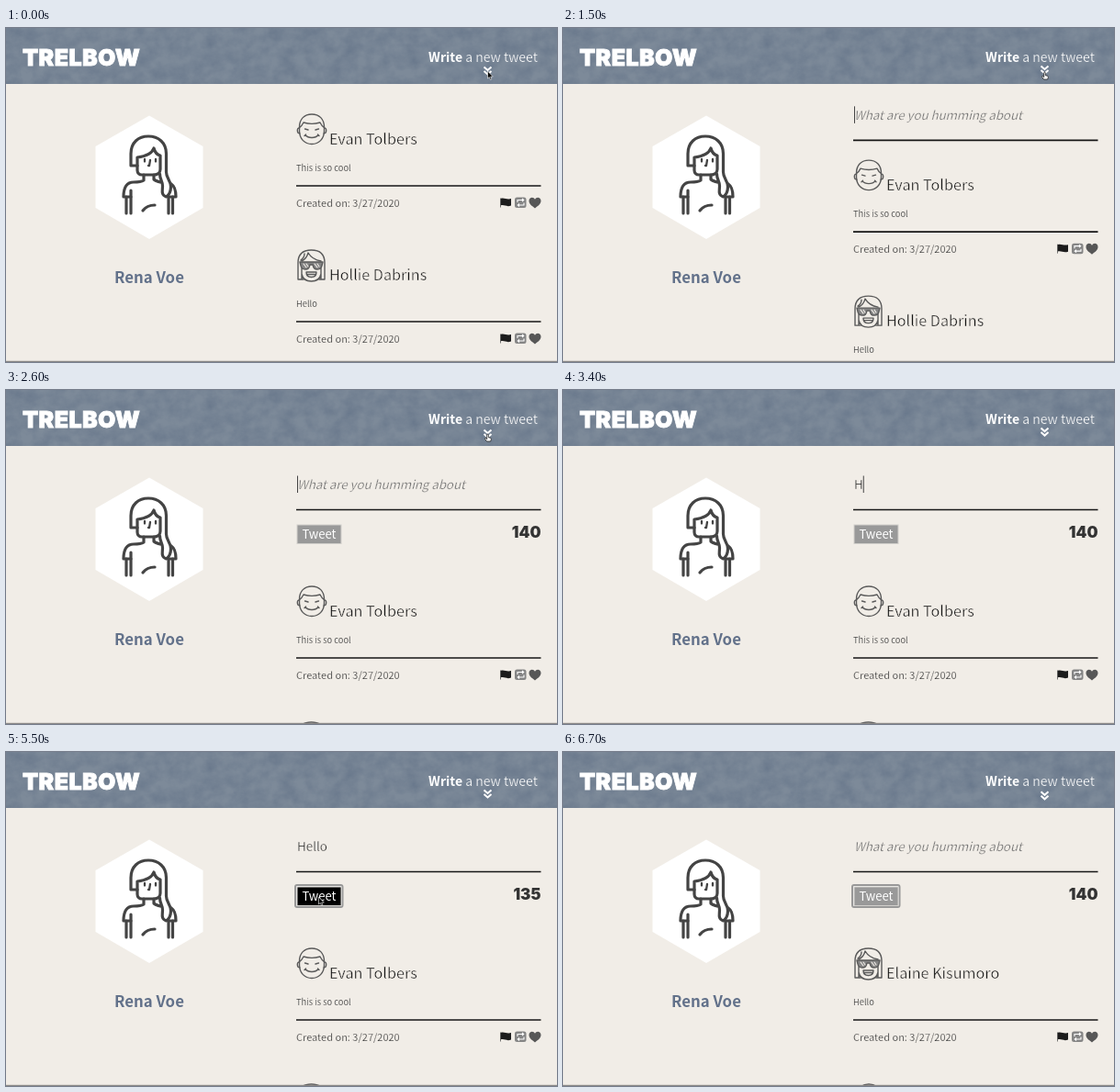
An HTML page that plays this animation: 600x364 px, repeating every 6800 ms.

```html
<!DOCTYPE html>
<html lang="en">
<head>
<meta charset="utf-8">
<title>Trelbow</title>
<style>
html, body { margin: 0; width: 100%; height: 100%; overflow: hidden; background: #f1ede7; }
svg { display: block; }
/* A thin stroke in the ground colour gives the text its light weight */
text {
  font-family: "Noto Sans CJK JP", "Noto Sans CJK SC", "Noto Sans CJK", "Open Sans", sans-serif;
  font-weight: 300; fill: #222; white-space: pre; stroke: #f1ede7; stroke-width: .25;
}
.bold { font-weight: 700; stroke: none; }
.block { font-family: Inter, "Liberation Sans", sans-serif; font-weight: 900; stroke: none; }
.name { font-size: 16.2px; fill: #111; stroke-width: .45; }
.message { font-size: 9.3px; fill: #444; stroke-width: .15; }
.date { font-size: 11px; fill: #333; }
.field { font-size: 13.4px; stroke-width: .35; }
.line { fill: none; stroke: #444; stroke-linecap: round; stroke-linejoin: round; }
.avatar { stroke: #5a5a5a; stroke-width: 1.4; }
.rule { stroke: #161616; stroke-width: 1.6; }
</style>
</head>
<body>
<svg width="600" height="364" viewBox="0 0 600 364">
  <defs>
    <filter id="mottle" x="0" y="0" width="100%" height="100%" color-interpolation-filters="sRGB">
      <feTurbulence type="fractalNoise" baseFrequency=".06 .07" numOctaves="5" seed="8"/>
      <feColorMatrix values="0 0 0 0 .4  0 0 0 0 .46  0 0 0 0 .54  1.3 0 0 0 -.35"/>
    </filter>
    <clipPath id="formClip"><rect id="formWindow" x="310" y="61" width="290" height="0"/></clipPath>

    <g id="man" class="line avatar">
      <path d="M3.500 15C3.500 6 9 1 17 1s13.500 5 13.500 14v4c0 9-6 14.500-13.500 14.500S3.500 28 3.500 19Z"/>
      <path d="M3.500 16C.5 15.500.5 22 4 22M30.500 16c3-.5 3 6-.5 6M4 15c2-1 3-3 4-5 5 1.500 13 1.500 18 0 1 2 2 4 4 5"/>
      <path d="M9.500 17l3.500 1M24.500 17l-3.500 1M10 23.500c3 4 11 4 14 0M9 24.500l1.500-1.500M25 24.500l-1.500-1.500"/>
    </g>
    <g id="woman" class="line avatar">
      <path d="M2 33V15C2 5 8 1 16.500 1S31 5 31 15v18H25M2 33h6M6 21v6c1 5 5 8 10.500 8s9.500-3 10.500-8v-6M6 32V21M27 32V21M6 13c4-2 6-5 7-9M13 4c3 5 8 8 14 9M9 5c0 3-1 5-4 7"/>
      <path d="M4 14h25l-1 4c-.5 3-2 4-5 4s-4-1-5-5h-3c-1 4-2 5-5 5s-4.500-1-5-4Z" fill="#858585"/>
      <path d="M8 16l3 4M11 16l2 3M20 16l3 4M23 16l2 3" stroke="#f1ede7" stroke-width="1.100"/>
      <path d="M11 25h11c0 4-2 5.500-5.500 5.500S11 29 11 25Zm1 2.500h9"/>
    </g>
    <g id="tools">
      <path d="M538.500 186c4-1.500 7 1.500 11.500 0v7.500c-5 2-7.500-1.500-11.500 0Z" fill="#1c1c1c"/>
      <path d="M538.500 185.500v10" stroke="#555" stroke-width=".8"/>
      <rect x="554" y="184.500" width="12.500" height="11.500" rx="2.500" fill="#858585"/>
      <path d="M557 190v-2.500h6.500m-1.500-1.500 1.700 1.500-1.700 1.500M564 190.500v2.500h-6.500m1.500-1.500-1.700 1.500 1.700 1.500" fill="none" stroke="#fff" stroke-width="1.100"/>
      <path d="M576 196.500c-4-3-6.500-5-6.500-8.200 0-4 5-5 6.500-1.500 1.500-3.500 6.500-2.500 6.500 1.500 0 3.200-2.500 5.200-6.500 8.200Z" fill="#575757"/>
    </g>
    <path id="arrow" d="M0 0V8l1.800-1.600L3 9.300 4.300 8.700 3.200 6H5.800Z" fill="#000" stroke="#fff" stroke-width=".6"/>
    <path id="hand" d="M-.8 0C-.8-1.200.8-1.200.8 0V2.600L3 3.200C4 3.500 4 4.600 3.200 7H-1L-3 4.200C-3 3-2 3.200-.8 4.600Z" fill="#fff" stroke="#222" stroke-width=".8"/>
    <path id="beam" d="M-2-4Q0-4 0-3Q0-4 2-4M0-3V4M-2 5Q0 5 0 4Q0 5 2 5M-1 1H1" fill="none" stroke="#222" stroke-width=".9"/>
  </defs>

  <rect width="600" height="364" fill="#f1ede7"/>

  <path d="M156 95.500l58.500 33.500v67L156 230 97.500 196v-67Z" fill="#fff"/>
  <g class="line" stroke="#3b3838" stroke-width="3.200">
    <path d="M143 150h-7V137c0-12 8-19 19-19s19.500 7 19.500 19v20c0 7 5 9 5 16 0 6-2 9-5 11-6-2-4-7-4-12 0-5-3-7-3-13"/>
    <path d="M143 141v14c0 3 2 5 5 5h13c4 0 7-2 7-6V139M143 141c8-1 16-4 18-10 1 4 3 7 7 8"/>
    <path d="M150 160v6c-3 2-7 2-11 2-7 0-11 5-11 16h8M161 160v5c2 2 4 2 7 3M180 170c3 2 5 7 5 14h-8"/>
    <path d="M136 177v25M131 184v18M177 184v18M181.500 184v18"/>
    <path d="M149 199c3-4 7-6 13-6"/>
    <path d="M151 143v2.500M163 143v2.500M157 144l-1 6h-1" stroke-width="2.300"/>
  </g>
  <text class="bold" x="156" y="278" font-size="16.800" text-anchor="middle" style="fill:#62718a">Rena Voe</text>

  <g id="list"></g>

  <g clip-path="url(#formClip)">
    <g id="form">
      <text id="hint" class="field" x="317" y="108" letter-spacing="-.08" font-style="italic" style="fill:#686868">What are you humming about</text>
      <text id="typed" class="field" x="317" y="108"></text>
      <path id="caret" d="M0 93.500V112" stroke="#444"/>
      <path class="rule" d="M316 130.500H582.500"/>
      <rect id="ring" x="315" y="145" width="51.500" height="24" rx="2" fill="#fff" stroke="#989898" stroke-width="2"/>
      <rect id="button" x="317" y="147" width="48" height="20.500" stroke="#d2d0cc"/>
      <text x="341" y="162" font-size="13.100" text-anchor="middle" style="fill:#fff;stroke:none">Tweet</text>
      <text id="count" class="block" x="582.500" y="161" font-size="17" text-anchor="end" style="fill:#333">140</text>
    </g>
  </g>

  <rect width="600" height="61" fill="#7d8a99"/>
  <rect width="600" height="61" filter="url(#mottle)"/>
  <text class="block" x="18" y="40.500" font-size="25" letter-spacing=".4" style="fill:#fff;stroke:#fff;stroke-width:.8">TRELBOW</text>
  <text x="579" y="36.500" font-size="14" text-anchor="end" style="fill:#fff;stroke:#788595"><tspan class="bold">Write</tspan> a new tweet</text>
  <path id="chevron" d="M520.500 41.500l4 3.500 4-3.500M520.500 46l4 3.500 4-3.500" fill="none" stroke="#fff" stroke-width="2"/>
  <rect y="362.800" width="600" height="1.200" fill="#8b8987"/>
  <use id="cursor"/>
</svg>

<script>
const LOOP = 6800, STEP = 100;
const SLIDE = { start: 1321, length: 400, push: 120, inset: 14 };
const FOCUS = 1290, CLICK = 5400, SENT = 5700, RELOAD = 5800;
const KEYS = [3400, 3600, 3800, 3900, 4200];
const WORD = "Hello";
const HOVER = [4700, 5800];

// Pointer path: time, x, y
const POINTER = [
  [0, 524.5, 47], [600, 524.5, 49], [4300, 524.5, 49], [4500, 365, 129],
  [4700, 341, 156], [5500, 340.5, 158], [5700, 340.5, 158], [6100, 30, 366]
];

const $ = id => document.getElementById(id);
const show = (id, on) => $(id).setAttribute("visibility", on ? "visible" : "hidden");
const move = (id, x, y) => $(id).setAttribute("transform", `translate(${x} ${y})`);
const between = (t, a, b) => t >= a && t < b;

const evan = { icon: "man", name: "Evan Tolbers", message: "This is so cool" };
const hollie = { icon: "woman", name: "Hollie Dabrins", message: "Hello" };
const elaine = { icon: "woman", name: "Elaine Kisumoro", message: WORD };
const before = [evan, hollie], after = [elaine, evan];

function post({ icon, name, message }, i) {
  return `<g transform="translate(0 ${i * 148})">
    <use href="#${icon}" x="316" y="93"/>
    <text class="name" x="352" y="127">${name}</text>
    <text class="message" x="316" y="156">${message}</text>
    <path class="rule" d="M316 172H582.500"/>
    <text class="date" x="316" y="195">Created on: 3/27/2020</text>
    <use href="#tools"/>
  </g>`;
}

let shown;
function fillList(posts) {
  if (posts === shown) return;
  shown = posts;
  $("list").innerHTML = posts.map(post).join("");
}

function drawSlide(t) {
  const p = Math.min(1, Math.max(0, (t - SLIDE.start) / SLIDE.length));
  const e = 0.5 - Math.cos(Math.PI * p) / 2;
  move("list", 0, SLIDE.push * e);
  move("form", 0, SLIDE.inset * (e - 1));
  $("formWindow").setAttribute("height", e && 16 + SLIDE.push * e);
}

function drawField(t) {
  const keysBy = time => KEYS.filter(k => k <= time).length;
  const sent = t >= SENT;
  const text = sent ? "" : WORD.slice(0, keysBy(t));
  $("typed").textContent = text;
  show("hint", !text);
  // The counter follows on key release
  $("count").textContent = 140 - (sent ? 0 : keysBy(t - STEP));

  const wake = KEYS.filter(k => k <= t).pop() || FOCUS;
  show("caret", between(t, FOCUS, CLICK) && (t - wake) % 1000 < 500);
  move("caret", 317.5 + (text ? $("typed").getComputedTextLength() : 0), 0);

  $("button").setAttribute("fill", between(t, ...HOVER) ? "#000" : "#999");
  show("ring", t >= CLICK);
}

function drawPointer(t) {
  const i = POINTER.findIndex(([time]) => time > t);
  const visible = i > 0 && !between(t, KEYS[0], 4300);
  show("cursor", visible);
  if (!visible) return;
  const [t0, x0, y0] = POINTER[i - 1], [t1, x1, y1] = POINTER[i];
  const p = (t - t0) / (t1 - t0);
  const x = x0 + (x1 - x0) * p, y = y0 + (y1 - y0) * p;
  const inField = t > 4300 && x > 316 && y > 85 && y < 132;
  const kind = inField ? "beam" : between(t, 500, KEYS[0]) ? "hand" : "arrow";
  $("cursor").setAttribute("href", "#" + kind);
  move("cursor", x, y);
}

function draw(t) {
  fillList(t < RELOAD ? before : after);
  drawSlide(t);
  drawField(t);
  drawPointer(t);
  move("chevron", 0, 1 - Math.cos(Math.PI * (t - 1500) / 1000));
}

const origin = performance.now();
function tick() {
  const t = (performance.now() - origin) % LOOP;
  draw(Math.floor(t / STEP) * STEP);
  requestAnimationFrame(tick);
}
tick();
</script>
</body>
</html>
```
